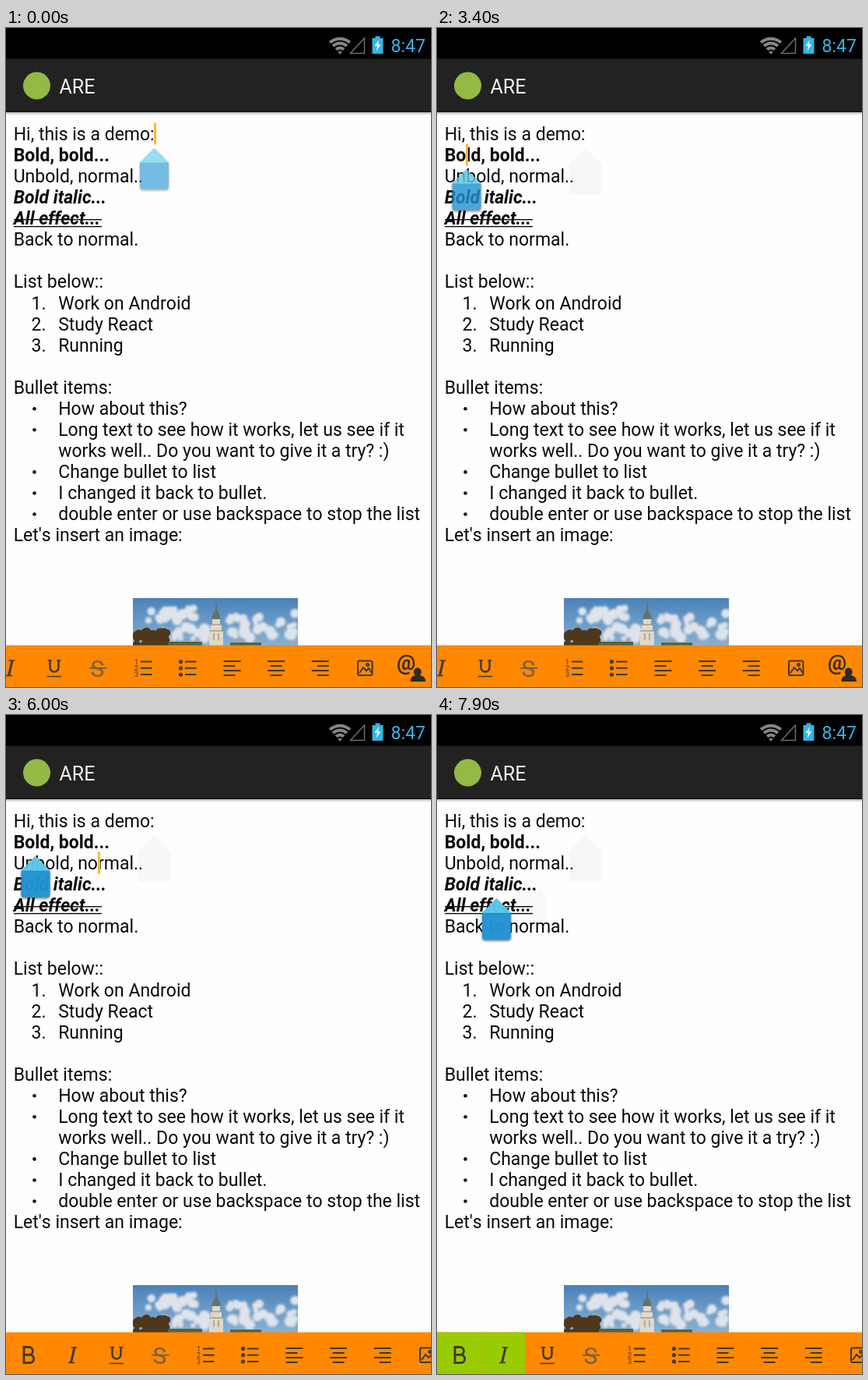
Write an HTML page that moves like this. It is 546x845 px and loops after 8 s.

```html
<!DOCTYPE html>
<html lang="en">
<head>
<meta charset="utf-8">
<title>Rich text editor demo</title>
<style>
  html, body { margin: 0; width: 100%; height: 100%; overflow: hidden; background: #fefefe; }
  svg { display: block; width: 546px; height: 845px; }
  text { font-family: Roboto, "Noto Sans", sans-serif; font-size: 23px; font-kerning: none; }
  .page { fill: #0a0a0a; }
  .bold { font-weight: 700; }
  .slant { font-weight: 700; font-style: italic; }
  .icons { fill: none; stroke: #40372c; stroke-width: 2; }
  .icons text { stroke: none; fill: #40372c; }
</style>
</head>
<body>
<svg viewBox="0 0 546 845">
  <defs>
    <linearGradient id="edge" x1="0" y1="0" x2="0" y2="1">
      <stop offset="0" stop-color="#aebbc4"/><stop offset="1" stop-color="#fefefe"/>
    </linearGradient>
    <linearGradient id="sky" x1="0" y1="0" x2="0" y2="1">
      <stop offset="0" stop-color="#4a82b8"/><stop offset="1" stop-color="#8ab0d2"/>
    </linearGradient>
    <filter id="soft" x="-20%" y="-20%" width="140%" height="150%">
      <feGaussianBlur stdDeviation="1.5"/>
    </filter>
    <clipPath id="frame"><rect x="163" y="731" width="212" height="61"/></clipPath>
    <path id="house" d="M0 0L18.500 18.500V48.500a4 4 0 0 1-4 4h-29a4 4 0 0 1-4-4V18.500z"/>
    <g id="handle">
      <use href="#house" y="2" fill="#000" opacity=".55" filter="url(#soft)"/>
      <use href="#house" fill="#2092d1"/>
      <path d="M0 0L18.500 18.500H-18.500z" fill="#5cc8ea"/>
    </g>
  </defs>

  <rect width="546" height="845" fill="#fefefe"/>
  <g id="ghosts" fill="#f7f7f7"></g>
  <g id="page" class="page"></g>

  <g clip-path="url(#frame)">
    <rect x="163" y="731" width="212" height="61" fill="url(#sky)"/>
    <g id="clouds" fill="#dfe3ea" filter="url(#soft)"></g>
    <g id="tree" fill="#4f371b"></g>
    <path d="M208 792v-5h44v5zM288 792v-4h40v4z" fill="#59623f"/>
    <path d="M261 792v-19h2v-8h2v-7h10v7h2v8h2v19z" fill="#e0d8c8"/>
    <path d="M270 734l1.500 14q4 4 4 10h-11q0-6 4-10z" fill="#60746a"/>
    <path d="M261 773h18M263 765h14M267 776v9M273 776v9" stroke="#897f70" fill="none"/>
  </g>

  <rect id="caret" width="3" height="28" fill="#ffb92e"/>
  <g id="handles"></g>

  <rect width="546" height="40" fill="#000"/>
  <g fill="none" stroke="#858585" stroke-width="4">
    <path d="M416 18.500q13-9.500 26 0M420 23q9-7 18 0M424 27.500q5-4 10 0"/>
    <path d="M426 30h6l-3 4z" fill="#858585" stroke="none"/>
    <path d="M460.500 13v19.500h-18z" stroke="#6c6c6c" stroke-width="1.500"/>
  </g>
  <path d="M470.500 13h4v-2.500h6v2.500h4v20h-14z" fill="#33b5e5"/>
  <path d="M479 15l-5.500 8h3.500l-1.500 7 6-9h-3.500z" fill="#e8f7fc"/>
  <text x="494.500" y="30.500" fill="#33b5e5">8:47</text>
  <rect y="39.500" width="546" height="68.500" fill="#222"/>
  <rect y="106.500" width="546" height="1.500" fill="#141414"/>
  <rect y="108" width="546" height="4" fill="url(#edge)"/>
  <circle cx="39.500" cy="74" r="17.500" fill="#94b944"/>
  <text x="68.500" y="84" fill="#f3f3f3" style="font-size:25px">ARE</text>

  <rect y="791.500" width="546" height="53.500" fill="#f80"/>
  <g id="bar">
    <rect id="boldOn" y="791.500" width="56.500" height="53.500" fill="#9c0"/>
    <rect id="slantOn" x="56.500" y="791.500" width="56.500" height="53.500" fill="#9c0"/>
    <g id="icons" class="icons">
      <path d="M23 810.500h6.500a4.900 4.900 0 0 1 0 9.800H23zM23 820.300h7.500a5.200 5.200 0 0 1 0 10.400H23z" stroke-width="2.800"/>
      <path d="M88 811l-4.500 19.500" stroke-width="3"/>
      <path d="M83.500 811h8M80 830.500h8" stroke-width="1.400"/>
      <path d="M136.500 810.500v9.500a5.500 5.500 0 0 0 11 0v-9.500" stroke-width="2.400"/>
      <path d="M133.500 810.700h5.500M145 810.700h5.500M132.500 831.500h18.500" stroke-width="1.600"/>
      <text x="188.500" y="831.500" style="font-size:30px;fill:#75603f">S</text>
      <path d="M187 820.800h22.500" stroke="#75603f"/>
      <rect x="532" y="811.500" width="18.500" height="18.500" rx="2"/>
      <path d="M534 827l5-7 4 4 3-3 4 6"/><circle cx="544.500" cy="816.500" r="1.500"/>
      <text x="582" y="823" style="font-size:27px;font-weight:700;fill:#3a2c1c">@</text>
      <path d="M599.500 838q0-7 6-8a5 5.500 0 1 1 6.500 0q7 1 7 8z" fill="#2f2a26" stroke="none"/>
    </g>
  </g>
  <rect id="overscroll" y="791.500" width="56" height="53.500" fill="#33b5e5"/>
</svg>

<script>
const LOOP = 8000, STEP = 100, BLINK = 350, LINE = 27.07;
const $ = id => document.getElementById(id);
const clamp = v => Math.min(1, Math.max(0, v));
const smooth = p => p * p * (3 - 2 * p);

function add(parent, tag, attrs, text = '') {
  const el = document.createElementNS('http://www.w3.org/2000/svg', tag);
  for (const k in attrs) el.setAttribute(k, attrs[k]);
  el.textContent = text;
  parent.append(el);
  return el;
}

// "1." or "*" before the bar marks a list item, ">" a wrapped one.
const lines = [
  'Hi, this is a demo:', 'Bold, bold...', 'Unbold, normal..', 'Bold italic...', 'All effect...',
  'Back to normal.', '', 'List below::', '1.|Work on Android', '2.|Study React', '3.|Running', '',
  'Bullet items:', '*|How about this?', '*|Long text to see how it works, let us see if it',
  '>|works well.. Do you want to give it a try? :)', '*|Change bullet to list',
  '*|I changed it back to bullet.', '*|double enter or use backspace to stop the list',
  "Let's insert an image:"
];
const styles = { 1: 'bold', 3: 'slant', 4: 'slant' };
const page = $('page');
lines.forEach((line, i) => {
  const y = 144 + i * LINE;
  const [mark, item] = line.split('|');
  if (item === undefined) {
    add(page, 'text', { x: 9.7, y, class: styles[i] || '' }, line);
    return;
  }
  add(page, 'text', { x: 67.2, y }, item);
  if (mark === '*') add(page, 'circle', { cx: 36.5, cy: y - 7.7, r: 2.3 });
  else if (mark !== '>') add(page, 'text', { x: 32.5, y }, mark);
});
for (const y of [245.7, 254.6]) add(page, 'rect', { x: 10, y: y - .7, width: 113, height: 1.4 });

// Photo: clusters of seeded puffs
let seed = 7;
const random = () => (seed = seed * 16807 % 2147483647) / 2147483647;
function puffs(parent, x, y, w, h, count) {
  for (let i = 0; i < count; i++) {
    add(parent, 'circle', {
      cx: x + (random() * 2 - 1) * w, cy: y + (random() * 2 - 1) * h, r: 3 + random() * 4
    });
  }
}
puffs($('clouds'), 215, 752, 32, 9, 24);
puffs($('clouds'), 232, 776, 30, 8, 18);
puffs($('clouds'), 330, 766, 45, 16, 36);
puffs($('tree'), 185, 784, 22, 10, 45);

// List and alignment icons
const icons = $('icons');
const rule = (x, y, w) => add(icons, 'path', { d: `M${x} ${y}h${w}` });
for (let i = 0; i < 3; i++) {
  const y = 812.5 + i * 8.25;
  rule(253, y, 14.5);
  rule(310, y, 14.5);
  add(icons, 'text', { x: 245, y: y + 3.2, style: 'font-size:9px' }, i + 1);
  add(icons, 'circle', { cx: 304.5, cy: y, r: 1.6 });
  for (let row = 0; row < 4; row++) {
    const w = row % 2 ? 15 : 22;
    rule(359.5 + i * 56.6 + (22 - w) * i / 2, 812 + row * 6, w);
  }
}

// Each tap puts the caret at x on a line; a replaced handle may leave a pale trace.
const taps = [
  { t: -250, x: 190.5, line: 0 },
  { t: 950, x: 190.5, line: 0, trace: 1 },
  { t: 3100, x: 38, line: 1 },
  { t: 5900, x: 118.5, line: 2, trace: .65 },
  { t: 6850, x: 76.5, line: 3 }
];
for (const tap of taps) {
  const at = `translate(${tap.x} ${154 + tap.line * LINE})`;
  tap.handle = add($('handles'), 'use', { href: '#handle', transform: at });
  tap.ghost = add($('ghosts'), 'use', { href: '#house', transform: at + ' scale(1.15 1.14)' });
}

const show = (el, opacity) => { el.style.opacity = opacity; };

function draw(time) {
  const t = Math.floor(time / STEP) * STEP;

  taps.forEach((tap, i) => {
    const left = i + 1 < taps.length ? t - taps[i + 1].t : -1;
    const fadeIn = clamp((t - tap.t - 100) / 240);
    const fadeOut = 1 - clamp((left - 100) / 200);
    show(tap.handle, .97 * fadeIn * fadeOut);
    show(tap.ghost, left >= 250 ? tap.trace || 0 : 0);
  });

  const tap = taps.filter(p => p.t <= t).pop();
  const caret = $('caret');
  caret.setAttribute('x', Math.floor(tap.x - .5));
  caret.setAttribute('y', 121.5 + tap.line * LINE);
  show(caret, Math.floor((t - tap.t) / BLINK) % 2 ? 0 : 1);

  // The toolbar glides back to its start, then its edge glow dies away.
  const shift = -80 * (1 - smooth(clamp((t - 4250) / 550)));
  $('bar').setAttribute('transform', `translate(${shift} 0)`);
  show($('overscroll'), t < 4700 ? 0 : .2 * clamp((5200 - t) / 400));
  show($('boldOn'), tap.line % 2);
  show($('slantOn'), tap.line === 3 ? 1 : 0);
}

const begin = performance.now();
function tick() {
  draw((performance.now() - begin) % LOOP);
  requestAnimationFrame(tick);
}
tick();
</script>
</body>
</html>
```
